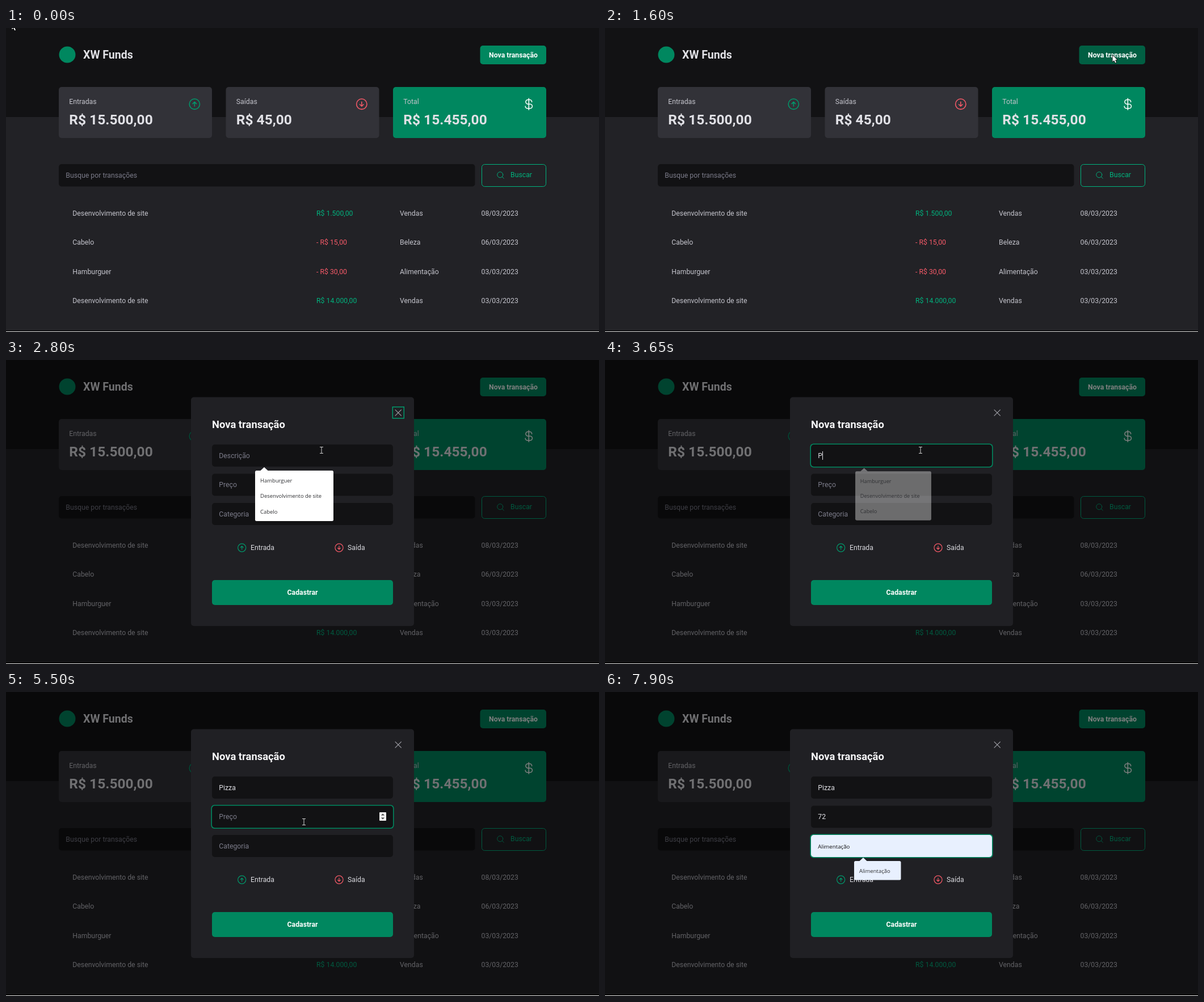
An HTML page with a canvas that plays this animation: 1045x536 px, repeating every 8 s.

```html
<!DOCTYPE html>
<html lang="pt-BR">
<head>
<meta charset="utf-8">
<title>Transações</title>
<style>
html, body { margin: 0; width: 100%; height: 100%; overflow: hidden; background: #121214; }
canvas { display: block; width: 1045px; height: 536px; }
</style>
</head>
<body>
<canvas id="stage" width="1045" height="536"></canvas>
<script>
const canvas = document.getElementById('stage');
const ctx = canvas.getContext('2d');
const LOOP = 8000, STEP = 50;
const UI = 'Roboto, sans-serif', SYSTEM = '"Open Sans", "Noto Sans", sans-serif';
const BODY = 12.27;
const C = {
  dark: '#121214', page: '#222226', modal: '#202024', card: '#323238',
  muted: '#7c7c8a', text: '#c4c4cc', bright: '#e1e1e6',
  green: '#00875f', mint: '#00b37e', deep: '#015f43', up: '#00986b', red: '#f75a68',
  fill: '#e8f0fe'
};

const icons = {
  up: 'M224 128a96 96 0 1 1-192 0a96 96 0 1 1 192 0M128 168V88M94 122L128 88L162 122',
  down: 'M224 128a96 96 0 1 1-192 0a96 96 0 1 1 192 0M128 88V168M94 134L128 168L162 134',
  dollar: 'M128 24V232M184 88a40 40 0 0 0-40-40H112a40 40 0 0 0 0 80h40a40 40 0 0 1 0 80H104a40 40 0 0 1-40-40',
  search: 'M200 116a84 84 0 1 1-168 0a84 84 0 1 1 168 0M175 175L224 224',
  close: 'M200 56L56 200M200 200L56 56'
};

function box(x, y, w, h, color, r = 5) {
  ctx.fillStyle = color;
  ctx.beginPath();
  ctx.roundRect(x, y, w, h, r);
  ctx.fill();
}

function frame(x, y, w, h, color, width, r = 0) {
  ctx.strokeStyle = color;
  ctx.lineWidth = width;
  ctx.beginPath();
  ctx.roundRect(x, y, w, h, r);
  ctx.stroke();
}

function text(str, x, y, color = C.text, size = BODY, weight = 400, align = 'left', family = UI) {
  ctx.font = `${weight} ${size}px ${family}`;
  ctx.textAlign = align;
  ctx.fillStyle = color;
  ctx.fillText(str, x, y);
}

function shape(points, color) {
  ctx.fillStyle = color;
  ctx.beginPath();
  points.forEach(([x, y]) => ctx.lineTo(x, y));
  ctx.closePath();
  ctx.fill();
}

function icon(name, cx, cy, size, color) {
  ctx.save();
  ctx.translate(cx - size / 2, cy - size / 2);
  ctx.scale(size / 256, size / 256);
  ctx.lineWidth = 16;
  ctx.lineCap = ctx.lineJoin = 'round';
  ctx.strokeStyle = color;
  ctx.stroke(new Path2D(icons[name]));
  ctx.restore();
}

// Pointer path: [start, end, x, y]
const start = [10, -9];
const moves = [
  [50, 250, 586, 180],
  [400, 1100, 894, 48],
  [1900, 2600, 556, 159],
  [4600, 4950, 525, 229],
  [6150, 6450, 524, 277]
];

function pointerAt(t) {
  let [x, y] = start;
  for (const [t0, t1, tx, ty] of moves) {
    const p = Math.min(1, Math.max(0, (t - t0) / (t1 - t0)));
    const e = p * p * (3 - 2 * p);
    x += (tx - x) * e;
    y += (ty - y) * e;
  }
  return [x, y];
}

const inside = ([px, py], x, y, w, h) => px >= x && px <= x + w && py >= y && py <= y + h;

const fields = [
  { label: 'Descrição', y: 149, word: 'Pizza', keys: [3600, 3900, 4000, 4150, 4300] },
  { label: 'Preço', y: 200.5, word: '72', keys: [5700, 5750] },
  { label: 'Categoria', y: 252, word: 'Al', keys: [7200, 7450] }
];
const blinks = [[3150, 3550], [4800, 5000], [5500, 5700], [6250, 6600], [7050, 7200]];

const focusAt = t => t >= 6600 ? 2 : t >= 5000 ? 1 : t >= 2900 ? 0 : -1;
const typed = (f, t) => f.word.slice(0, f.keys.filter(k => k <= t).length);

const rows = [
  ['Desenvolvimento de site', 'R$ 1.500,00', 'Vendas', '08/03/2023'],
  ['Cabelo', '- R$ 15,00', 'Beleza', '06/03/2023'],
  ['Hamburguer', '- R$ 30,00', 'Alimentação', '03/03/2023'],
  ['Desenvolvimento de site', 'R$ 14.000,00', 'Vendas', '03/03/2023']
];

function card(x, label, value, name, color, bg) {
  box(x, 104, 270, 90, bg);
  text(label, x + 18.3, 133.5);
  text(value, x + 18.3, 169.5, C.bright, 24.53, 700);
  icon(name, x + 239.3, 134.2, 24.5, color);
}

function page(hover) {
  box(0, 0, 1045, 536, C.page, 0);
  box(0, 0, 1045, 157, C.dark, 0);
  ctx.fillStyle = C.green;
  ctx.beginPath();
  ctx.arc(108, 47, 14.5, 0, Math.PI * 2);
  ctx.fill();
  text('XW Funds', 136, 54, C.bright, 19.5, 700);

  box(835.5, 31, 116.5, 33, hover ? C.deep : C.green);
  text('Nova transação', 894, 51.5, '#fff', BODY, 700, 'center');

  card(93, 'Entradas', 'R$ 15.500,00', 'up', C.up, C.card);
  card(387.5, 'Saídas', 'R$ 45,00', 'down', C.red, C.card);
  card(682, 'Total', 'R$ 15.455,00', 'dollar', '#fff', C.green);

  box(93, 240, 733.5, 39.5, C.dark);
  text('Busque por transações', 105.3, 264, C.muted);
  frame(838.5, 240.5, 113, 39, C.mint, 1, 5);
  icon('search', 871.5, 259.5, 15.3, C.mint);
  text('Buscar', 889, 263.3, C.mint);

  rows.forEach(([name, price, kind, date], i) => {
    const y = 331 + i * 51.4;
    text(name, 117.3, y);
    text(price, 547, y, price[0] === '-' ? C.red : C.mint);
    text(kind, 694, y);
    text(date, 837.5, y);
  });
}

function spinner(x, y) {
  box(x, y, 12, 15, '#efefef', 1);
  const cx = x + 6;
  shape([[cx - 3, y + 5.5], [cx, y + 2.5], [cx + 3, y + 5.5]], '#444');
  shape([[cx - 3, y + 9.5], [cx, y + 12.5], [cx + 3, y + 9.5]], '#444');
}

function input(f, i, t, focus, pointer) {
  const { y } = f, active = focus === i, value = typed(f, t);
  const preview = i === 2 && t >= 7900;
  if (active) box(361.4, y - 1.6, 322.2, 42.2, C.green, 6);
  box(363, y, 319, 39, preview ? C.fill : C.dark);
  if (preview) {
    text('Alimentação', 375.3, y + 23.6, '#111', 9.7, 400, 'left', SYSTEM);
    return;
  }
  text(value || f.label, 375.3, y + 23.8, value ? C.bright : C.muted);
  const lit = !blinks.some(([a, b]) => t >= a && t < b);
  if (active && lit) {
    const w = value ? ctx.measureText(value).width : 0;
    box(Math.round(375 + w), Math.round(y + 12), 1, 15, C.bright, 0);
  }
  if (i === 1 && (active || inside(pointer, 363, y, 319, 39))) spinner(658, 212);
}

function popup(items, y, w, h, color, alpha = 1) {
  const x = 439, scale = alpha < 1 ? 0.97 : 1;
  ctx.save();
  ctx.translate(x + w / 2, y + h / 2);
  ctx.scale(scale, scale);
  ctx.translate(-x - w / 2, -y - h / 2);
  ctx.globalAlpha = alpha;
  shape([[455, y - 6], [461.5, y], [448.5, y]], color);
  box(x, y, w, h, color, 2.5);
  ctx.globalAlpha = 1;
  items.forEach((item, i) =>
    text(item, 448, y + 20.8 + i * 27.5, '#2f3033', 9.45, 400, 'left', SYSTEM));
  ctx.restore();
}

function modal(t, pointer) {
  const focus = focusAt(t);
  box(0, 0, 1045, 534, 'rgba(0,0,0,.5)', 0);
  box(326, 65.5, 393, 403.5, C.modal);
  text('Nova transação', 363, 119.8, '#f5f5f7', 18.4, 700);
  if (focus < 0) frame(681.3, 82.8, 20, 20, C.up, 1.5);
  icon('close', 691.2, 93, 18.4, '#a0a0a8');

  fields.forEach((f, i) => input(f, i, t, focus, pointer));

  icon('up', 415.7, 331, 18.8, C.up);
  text('Entrada', 431, 335, '#d8d8dd');
  icon('down', 587, 331, 18.8, C.red);
  text('Saída', 602, 335, '#d8d8dd');

  box(363, 388, 319, 44, C.green);
  text('Cadastrar', 522.5, 413.8, '#fff', BODY, 700, 'center');

  if (t >= 2800 && t < 3800) {
    const alpha = t < 3600 ? 1 : t < 3650 ? 0.8 : 0.38;
    popup(['Hamburguer', 'Desenvolvimento de site', 'Cabelo'], 195, 138, 89, '#fff', alpha);
  }
  if (t >= 7300) popup(['Alimentação'], 298, 82.5, 33.5, t >= 7800 ? C.fill : '#fff');
}

function arrow(x, y) {
  ctx.save();
  ctx.translate(x, y);
  ctx.strokeStyle = '#000';
  ctx.lineWidth = 1.4;
  ctx.lineJoin = 'round';
  const p = new Path2D('M.5 0V11.5L3.2 9L5.2 13.5L7 12.7L5.1 8.3H8.6Z');
  ctx.stroke(p);
  ctx.fillStyle = '#fff';
  ctx.fill(p);
  ctx.restore();
}

function beam(x, y) {
  const cx = Math.round(x), cy = Math.round(y);
  box(cx - 0.5, cy - 6, 1, 12, '#d0d0d0', 0);
  box(cx - 3, cy - 6, 6, 1, '#d0d0d0', 0);
  box(cx - 3, cy + 5, 6, 1, '#d0d0d0', 0);
}

function draw(t) {
  const pointer = pointerAt(t), open = t >= 1650;
  page(!open && inside(pointer, 835.5, 31, 116.5, 33));
  if (open) modal(t, pointer);
  box(0, 534, 1045, 1, '#000', 0);
  box(0, 535, 1045, 1, '#f0f0f0', 0);
  const overField = open && fields.some(f => inside(pointer, 363, f.y, 319, 39));
  if (!overField) arrow(...pointer);
  else if (t < 7800) beam(...pointer);
}

function tick() {
  const t = performance.now() % LOOP;
  draw(Math.floor(t / STEP) * STEP);
  requestAnimationFrame(tick);
}
tick();
</script>
</body>
</html>
```
